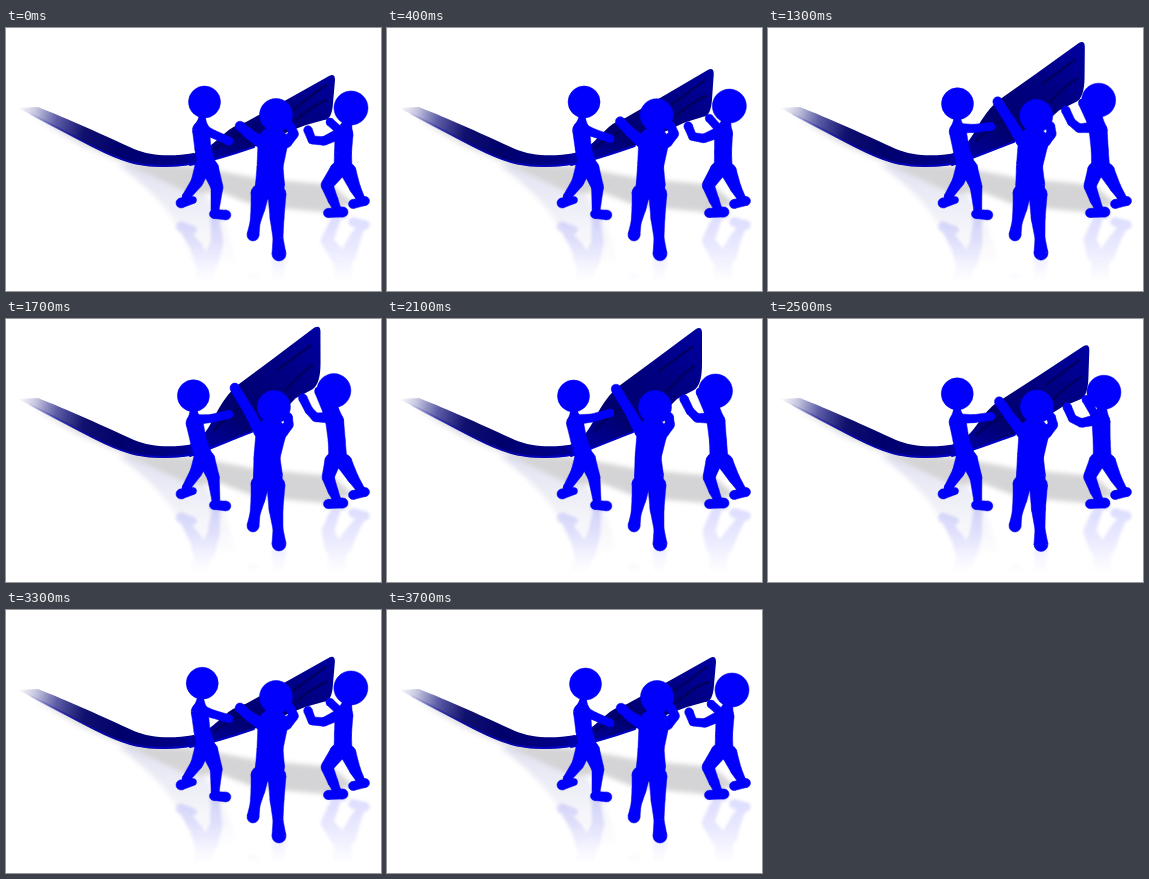
Write an HTML page that moves like this. It is 375 px wide and 263 px high and loops after 3.8 s.

```html
<!DOCTYPE html>
<html lang="en">
<head>
<meta charset="utf-8">
<title>Lifting the ribbon together</title>
<style>
html, body { margin: 0; width: 100%; height: 100%; overflow: hidden; background: #fff; }
svg { display: block; width: 100vw; height: 100vh; }
.man path { fill: #0000fc; stroke: #0000d2; stroke-width: .5; }
</style>
</head>
<body>
<svg viewBox="0 0 375 263">
  <defs>
    <linearGradient id="tail" gradientUnits="userSpaceOnUse" x1="12" y1="80" x2="190" y2="132">
      <stop offset="0" stop-color="#fff"/>
      <stop offset=".1" stop-color="#c3c3de"/>
      <stop offset=".22" stop-color="#5c5ca6"/>
      <stop offset=".38" stop-color="#10106e"/>
      <stop offset=".6" stop-color="#00006c"/>
      <stop offset="1" stop-color="#000092"/>
    </linearGradient>
    <linearGradient id="rim" gradientUnits="userSpaceOnUse" x1="20" y1="0" x2="185" y2="0">
      <stop offset="0" stop-color="#2020b0" stop-opacity="0"/>
      <stop offset=".4" stop-color="#0808a0"/>
      <stop offset="1" stop-color="#0000c8"/>
    </linearGradient>
    <linearGradient id="sheet" x1="0" y1="1" x2="1" y2="0">
      <stop offset="0" stop-color="#0000b0"/>
      <stop offset=".35" stop-color="#00006e"/>
      <stop offset=".7" stop-color="#000084"/>
      <stop offset="1" stop-color="#0000a2"/>
    </linearGradient>
    <linearGradient id="fade" gradientUnits="userSpaceOnUse" x1="0" y1="180" x2="0" y2="254">
      <stop offset="0" stop-color="#fff"/>
      <stop offset=".5" stop-color="#999"/>
      <stop offset="1" stop-color="#000"/>
    </linearGradient>
    <linearGradient id="glow" gradientUnits="userSpaceOnUse" x1="0" y1="140" x2="0" y2="238">
      <stop offset="0" stop-color="#e3e3f2"/>
      <stop offset="1" stop-color="#fff"/>
    </linearGradient>
    <mask id="floor" maskUnits="userSpaceOnUse" x="0" y="0" width="375" height="263">
      <rect width="375" height="263" fill="url(#fade)"/>
    </mask>
    <filter id="soft" x="-20%" y="-20%" width="140%" height="140%"><feGaussianBlur stdDeviation="2.5"/></filter>
    <filter id="haze" x="-20%" y="-20%" width="140%" height="140%"><feGaussianBlur stdDeviation="1.4"/></filter>
  </defs>
  <rect width="375" height="263" fill="#fff"/>
  <g filter="url(#soft)">
    <path fill="url(#glow)" d="M112 137L180 140L216 190L232 236L186 238Q178 184 112 137Z"/>
    <path fill="#e2e2e6" d="M28 90L70 106L130 134L126 139L74 117Z"/>
    <path fill="#d4d4d6" d="M118 135L186 138L250 150L326 157L348 176L318 184L250 178L214 164L184 166Z"/>
  </g>
  <g mask="url(#floor)">
    <g opacity=".15" filter="url(#haze)">
      <use href="#left" transform="matrix(1 0 0 -1 0 374)"/>
      <use href="#right" transform="matrix(1 0 0 -1 0 370)"/>
      <use href="#front" transform="matrix(1 0 0 -1 0 458)"/>
    </g>
  </g>
  <path fill="url(#tail)" d="M12 80L32 79C60 90 100 108 128 121C145 128 165 129 188 125L188 136C165 140 145 139 130 136C104 130 70 110 12 80Z"/>
  <path fill="none" stroke="url(#rim)" stroke-width="2" d="M24 86C72 110 104 130 130 135.500C145 138.500 165 139 188 135.500"/>
  <path id="cloth" fill="url(#sheet)"/>
  <path id="folds" fill="none" stroke="#000052" stroke-width="2.500" stroke-linecap="round" opacity=".75"/>
  <path id="edge" fill="none" stroke="#0000c4" stroke-width="2" stroke-linecap="round"/>
  <g id="left" class="man"></g>
  <g id="right" class="man"></g>
  <g id="front" class="man"></g>
</svg>
<script>
const LOOP = 3800, STEP = 100;
const $ = id => document.getElementById(id);
const mix = (a, b, p) => a + (b - a) * p;

// Time and value pairs for each channel
const lift = [[0, 0], [400, .16], [900, .57], [1300, .87], [1800, 1.06], [2100, 1], [2900, .14], [3700, 0]];
const lean = [[0, 0], [400, .12], [900, .46], [1300, .75], [1800, .96], [2100, 1], [2900, .5], [3700, 0]];
const rise = [[0, 0], [900, .4], [1300, .2], [2100, 0], [2900, 1], [3700, 0]];

// Limbs are chains of joints: low x, low y, high x, high y, radius
const men = {
  left: [
    [[197, 138, 196, 138, 8], [191, 154, 190, 153, 6], [180, 169, 180, 169, 4]],
    [[187, 172, 187, 172, 3.5], [175, 175, 175, 175, 5]],
    [[204, 140, 200, 140, 8.5], [211, 159, 207, 158, 6], [209, 182, 210, 181, 4]],
    [[208, 186, 208, 186, 4.5], [220, 187, 220, 187, 4.8]],
    [[196, 92, 187, 94, 4], [195, 102, 188, 104, 8.5], [197, 122, 192, 122, 8], [202, 140, 198, 140, 9]],
    [[193, 99, 187, 101, 5], [207, 106, 205, 99, 4], [223, 113, 223, 94, 4]],
    [[198.5, 74, 186.5, 77, 16]]
  ],
  right: [
    [[342, 143, 338, 143, 8], [349, 160, 347, 159, 5.5], [355, 171, 355, 171, 4]],
    [[347, 176, 347, 176, 4.5], [359, 173, 359, 173, 4.5]],
    [[332, 142, 327, 142, 8], [321, 157, 322, 158, 6], [327, 172, 327, 172, 5], [331, 181, 331, 181, 4]],
    [[322, 185, 322, 185, 4.5], [337, 184, 337, 184, 5]],
    [[333, 102, 321, 92, 4], [324, 94, 313, 73, 4]],
    [[341, 96, 328, 90, 5], [338, 106, 329, 102, 9], [337, 125, 331, 122, 8.5], [337, 140, 332, 140, 9]],
    [[335, 105, 326, 99, 5.5], [318, 113, 310, 99, 4.3], [306, 112, 303, 92, 4], [302, 102, 297, 80, 4.3]],
    [[345, 80, 328.5, 72, 17]]
  ],
  front: [
    [[254, 165, 254, 165, 9], [252, 180, 252, 180, 7], [249, 195, 249, 195, 5], [247, 207, 247, 207, 6]],
    [[271, 166, 270, 166, 9], [271, 190, 270, 190, 7], [272, 210, 272, 210, 5], [273, 226, 273, 225, 7]],
    [[280, 114, 276, 113, 6], [288, 106, 283, 106, 4.5], [284, 98, 282, 98, 4.5]],
    [[267, 114, 265, 114, 15], [264, 138, 261, 138, 13], [264, 157, 262, 157, 14.5]],
    [[255, 114, 254, 113, 6], [243, 106, 243, 93, 5], [234, 98, 229, 70, 4.8]],
    [[270, 87, 268, 88, 16.5]]
  ]
};

// Smooth curve through uneven keys
function sample(keys, t) {
  const last = keys.length - 1;
  if (t >= keys[last][0]) return keys[last][1];
  const i = keys.findIndex(k => k[0] > t) - 1;
  const slope = j => j <= 0 || j >= last ? 0 :
    (keys[j + 1][1] - keys[j - 1][1]) / (keys[j + 1][0] - keys[j - 1][0]);
  const [t0, a] = keys[i], [t1, b] = keys[i + 1];
  const h = t1 - t0, s = (t - t0) / h, q = 1 - s;
  return a * (1 + 2 * s) * q * q + b * s * s * (3 - 2 * s) +
    h * s * q * (slope(i) * q - slope(i + 1) * s);
}

const disc = ([x, y, r]) => `M${x + r} ${y}A${r} ${r} 0 1 0 ${x - r} ${y}A${r} ${r} 0 1 0 ${x + r} ${y}Z`;

function bone([x, y, r], [u, v, s]) {
  const d = Math.hypot(u - x, v - y), nx = (y - v) / d, ny = (u - x) / d;
  return `M${x + nx * r} ${y + ny * r}L${u + nx * s} ${v + ny * s}` +
    `L${u - nx * s} ${v - ny * s}L${x - nx * r} ${y - ny * r}Z`;
}

// Outline first, then fill, so joints inside one limb leave no seams
function poseMan(name, p, bump) {
  men[name].forEach((chain, i) => {
    const joints = chain.map(([x, y, u, v, r]) => {
      const h = mix(y, v, p);
      return [mix(x, u, p), h + bump * Math.max(0, (140 - h) / 60), r];
    });
    const d = joints.map((j, k) => disc(j) + (k ? bone(joints[k - 1], j) : "")).join("");
    $(name).children[i].setAttribute("d", d);
  });
}

function poseCloth(p) {
  const at = (x, y, u, v) => `${mix(x, u, p).toFixed(2)} ${mix(y, v, p).toFixed(2)} `;
  const foot = at(248, 119, 246, 113);
  const belly = `C${at(222, 128, 222, 122)}${at(205, 133, 205, 130)}184 137`;
  $("cloth").setAttribute("d",
    "M180 127C" + at(200, 124, 198, 122) + at(206, 116, 204, 106) + at(218, 106, 213, 90) +
    "Q" + at(226, 98, 222, 75) + at(240, 94, 232, 67) +
    "L" + at(282, 71, 266, 42) + "L" + at(323, 48, 309, 10) +
    "Q" + at(329, 45, 315, 7) + at(329, 52, 315, 14) +
    "L" + at(327, 75, 315, 45) + "Q" + at(326, 92, 315, 66) + at(318, 92, 307, 71) +
    "L" + at(300, 97, 290, 80) + "L" + at(284, 103, 280, 90) + "L" + foot + belly + "Z");
  $("edge").setAttribute("d", "M" + foot + belly);
  $("folds").setAttribute("d",
    "M" + at(209, 121, 208, 112) + "Q" + at(222, 110, 219, 98) + at(242, 103, 242, 84) +
    "M" + at(286, 82, 272, 52) + "L" + at(320, 57, 305, 28) +
    "M" + at(290, 92, 280, 72) + "Q" + at(306, 78, 292, 58) + at(321, 72, 307, 47));
}

for (const name in men) {
  for (const chain of men[name]) {
    const path = document.createElementNS("http://www.w3.org/2000/svg", "path");
    path.setAttribute("paint-order", "stroke");
    $(name).append(path);
  }
}

function draw(now) {
  const t = Math.floor(now % LOOP / STEP) * STEP;
  const up = sample(lift, t), bump = sample(rise, t);
  poseCloth(up);
  poseMan("left", sample(lean, t), -2.5 * bump);
  poseMan("right", up, -4 * bump);
  poseMan("front", up, 0);
}

function tick() {
  draw(performance.now());
  requestAnimationFrame(tick);
}
draw(0);
requestAnimationFrame(tick);
</script>
</body>
</html>
```
